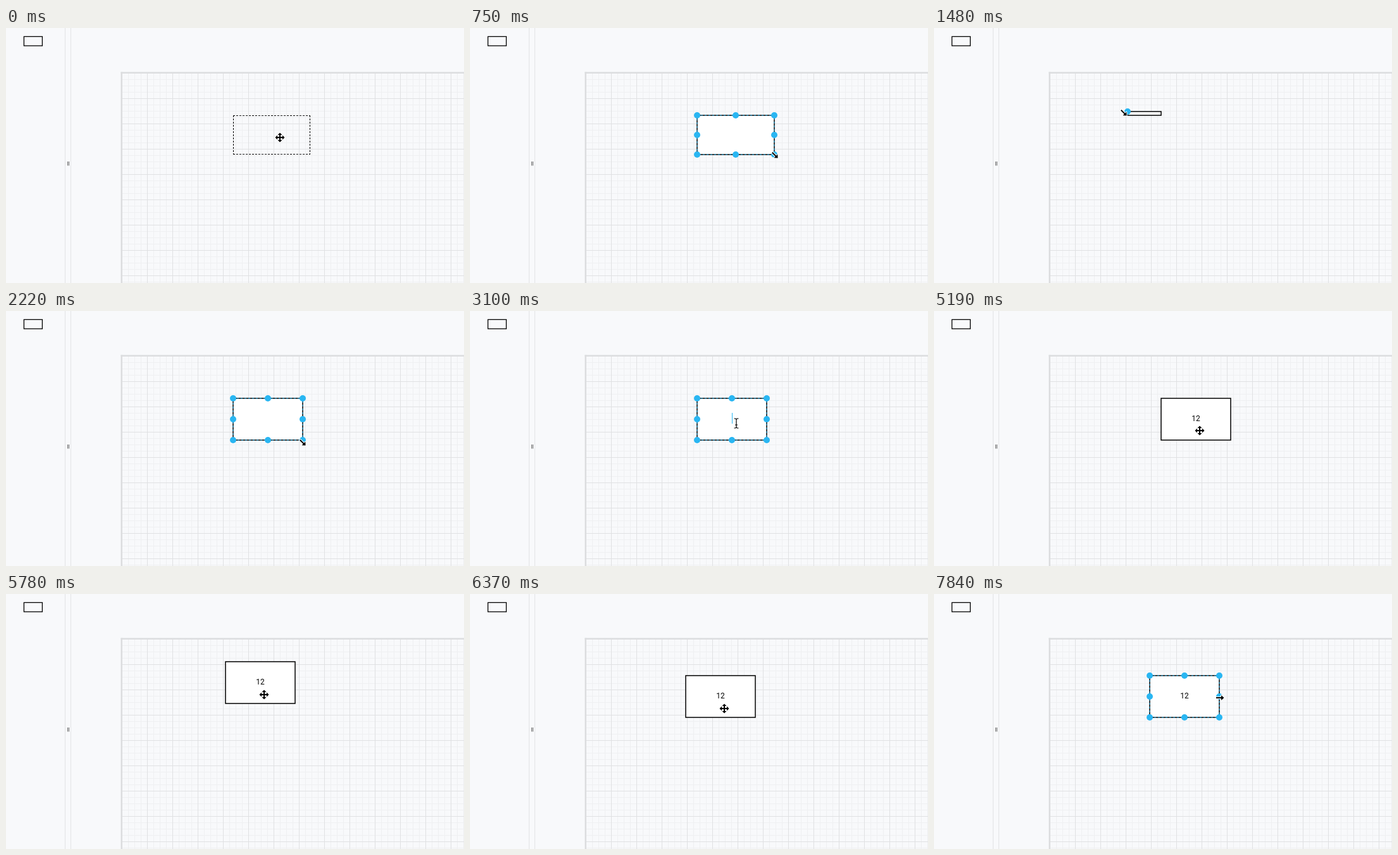
An HTML page with a canvas for the animation above (7990 ms loop, 724 by 403 pixels).

```html
<!DOCTYPE html>
<html lang="en">
<head>
<meta charset="utf-8">
<title>Diagram editor</title>
<style>
html, body { margin: 0; width: 100%; height: 100%; overflow: hidden; background: #f8f9fb; }
canvas { display: block; }
</style>
</head>
<body>
<canvas id="stage" width="724" height="403"></canvas>
<script>
const ctx = document.getElementById('stage').getContext('2d');
const LOOP = 7990, TICK = 148;
const BLUE = '#29b6f2';

// Key poses are [tick, x, y]; ticks between them are interpolated.
const pointerPath = [
  [1, 433, 173], [4, 488, 203], [5, 482, 201],
  [15, 469, 208], [16, 471, 212], [19, 421, 177], [28, 421, 177],
  [31, 443, 234], [32, 443, 236], [34, 427, 198], [35, 420, 189], [36, 420, 189],
  [44, 440, 177], [47, 448, 165], [52, 448, 165], [53, 452, 164]
];
const cornerPath = [[6, 481, 200], [7, 495, 204], [8, 514, 160], [10, 306, 132], [12, 330, 214], [14, 469, 204]];
const originPath = [[36, 359, 138], [37, 446, 143], [38, 424, 107], [39, 347, 107], [41, 341, 129]];

const within = (tick, first, last) => tick >= first && tick <= last;

function along(path, tick) {
  const next = path.findIndex(key => key[0] > tick);
  if (next <= 0) return path.at(next).slice(1);
  const [t0, x0, y0] = path[next - 1], [t1, x1, y1] = path[next];
  const p = (tick - t0) / (t1 - t0);
  return [Math.round(x0 + (x1 - x0) * p), Math.round(y0 + (y1 - y0) * p)];
}

function pointerAt(tick) {
  if (within(tick, 7, 14)) {
    const [x, y] = along(cornerPath, tick);
    return [x - 6, y + 2];
  }
  if (within(tick, 37, 43)) {
    const [x, y] = along(originPath, tick);
    return [x + 61, y + 52];
  }
  return along(pointerPath, tick);
}

function pointerKind(tick) {
  if (within(tick, 4, 16)) return 'diagonal';
  if (within(tick, 21, 28)) return 'text';
  if (within(tick, 29, 33)) return 'arrow';
  return tick >= 46 ? 'east' : 'move';
}

function line(x1, y1, x2, y2, color, width = 1) {
  ctx.strokeStyle = color;
  ctx.lineWidth = width;
  ctx.beginPath();
  ctx.moveTo(x1, y1);
  ctx.lineTo(x2, y2);
  ctx.stroke();
}

function drawPage() {
  ctx.fillStyle = '#f8f9fb';
  ctx.fillRect(0, 0, 724, 403);
  for (const major of [false, true]) {
    const color = major ? '#e0e1e3' : '#eff0f2';
    for (let i = 1; i < 55; i++) {
      if ((i % 4 === 0) !== major) continue;
      const x = 183.5 + i * 10, y = 71.5 + i * 10;
      line(x, 71, x, 403, color);
      line(183, y, 724, y, color);
    }
  }
  line(182.75, 69.5, 182.75, 403, '#dcdddf', 2.5);
  line(181.5, 70.75, 724, 70.75, '#dcdddf', 2.5);
  for (const x of [93.5, 102.5]) line(x, 0, x, 403, '#e2e3e5');
  for (const x of [97.5, 99.5]) line(x, 211, x, 217.5, '#666');
  ctx.strokeStyle = '#000';
  ctx.lineWidth = 1.3;
  ctx.strokeRect(28.4, 13.5, 29, 14.6);
}

function drawOutline(x, y, w, h) {
  const right = x + w - 0.5, bottom = y + h - 0.5;
  ctx.setLineDash([3, 2]);
  for (const edge of [y + 0.5, bottom]) line(x, edge, x + w, edge, '#000');
  for (const edge of [x + 0.5, right]) line(edge, y, edge, y + h, '#000');
  ctx.setLineDash([]);
}

function handle(x, y) {
  ctx.fillStyle = BLUE;
  ctx.beginPath();
  ctx.arc(x, y, 5, 0, 7);
  ctx.fill();
}

function drawSelection(x, y, w, h) {
  ctx.strokeStyle = BLUE;
  ctx.lineWidth = 1;
  ctx.setLineDash([3, 3]);
  ctx.strokeRect(x, y, w, h);
  ctx.setLineDash([]);
  for (const u of [0, 0.5, 1])
    for (const v of [0, 0.5, 1])
      if (u !== 0.5 || v !== 0.5) handle(x + u * w, y + v * h);
}

function drawBox(tick) {
  const [x, y] = along(originPath, tick);
  const [right, bottom] = along(cornerPath, tick);
  const w = right - 359, h = bottom - 138;
  if (tick < 1) return drawOutline(x, y, w, h);

  ctx.fillStyle = '#fff';
  ctx.strokeStyle = '#000';
  ctx.lineWidth = 1.5;
  ctx.fillRect(x, y, w, h);
  ctx.strokeRect(x, y, w, h);
  if (within(tick, 7, 14)) handle(right, bottom);
  else if (tick < 32 || tick >= 44) drawSelection(x, y, w, h);

  const text = '12'.slice(0, Math.max(0, tick - 26));
  const middle = x + w / 2;
  ctx.fillStyle = '#000';
  ctx.font = '12px Roboto, sans-serif';
  ctx.textAlign = 'center';
  ctx.fillText(text, middle, y + h / 2 + 3.3);
  if (within(tick, 21, 23) || within(tick, 27, 29)) {
    const caret = Math.round(middle + ctx.measureText(text).width / 2) + 0.5;
    line(caret, 161, caret, 178, BLUE);
  }
}

const glyphs = {
  move: new Path2D('M0-7.5 3.5-4H1V-1H4V-3.5L7.5 0 4 3.5V1H1V4H3.5L0 7.5-3.5 4H-1V1H-4V3.5L-7.5 0-4-3.5V-1H-1V-4H-3.5Z'),
  arrow: new Path2D('M.5.5V14L3.6 11.1 6 16.4 8.2 15.4 5.9 10.2H10.2Z'),
  east: new Path2D('M-6-1H2V-4L6.5 0 2 4V1H-6Z'),
  text: new Path2D('M-3.5-7H-1.5L0-6 1.5-7H3.5M-3.5 8H-1.5L0 7 1.5 8H3.5M0-6V7M-2 3H2')
};
glyphs.diagonal = glyphs.east;

function drawPointer(tick) {
  const kind = pointerKind(tick);
  const isText = kind === 'text';
  ctx.save();
  ctx.translate(...pointerAt(tick));
  if (kind === 'diagonal') ctx.rotate(Math.PI / 4);
  ctx.lineJoin = 'round';
  ctx.strokeStyle = '#fff';
  ctx.lineWidth = isText ? 3 : 2;
  ctx.stroke(glyphs[kind]);
  ctx.fillStyle = ctx.strokeStyle = '#000';
  ctx.lineWidth = 1.2;
  if (isText) ctx.stroke(glyphs.text);
  else ctx.fill(glyphs[kind]);
  ctx.restore();
}

const startTime = performance.now();

function render() {
  const time = Math.max(0, performance.now() - startTime) % LOOP;
  const tick = Math.min(53, Math.floor((time + 10) / TICK));
  drawPage();
  drawBox(tick);
  drawPointer(tick);
  requestAnimationFrame(render);
}
render();
</script>
</body>
</html>
```
